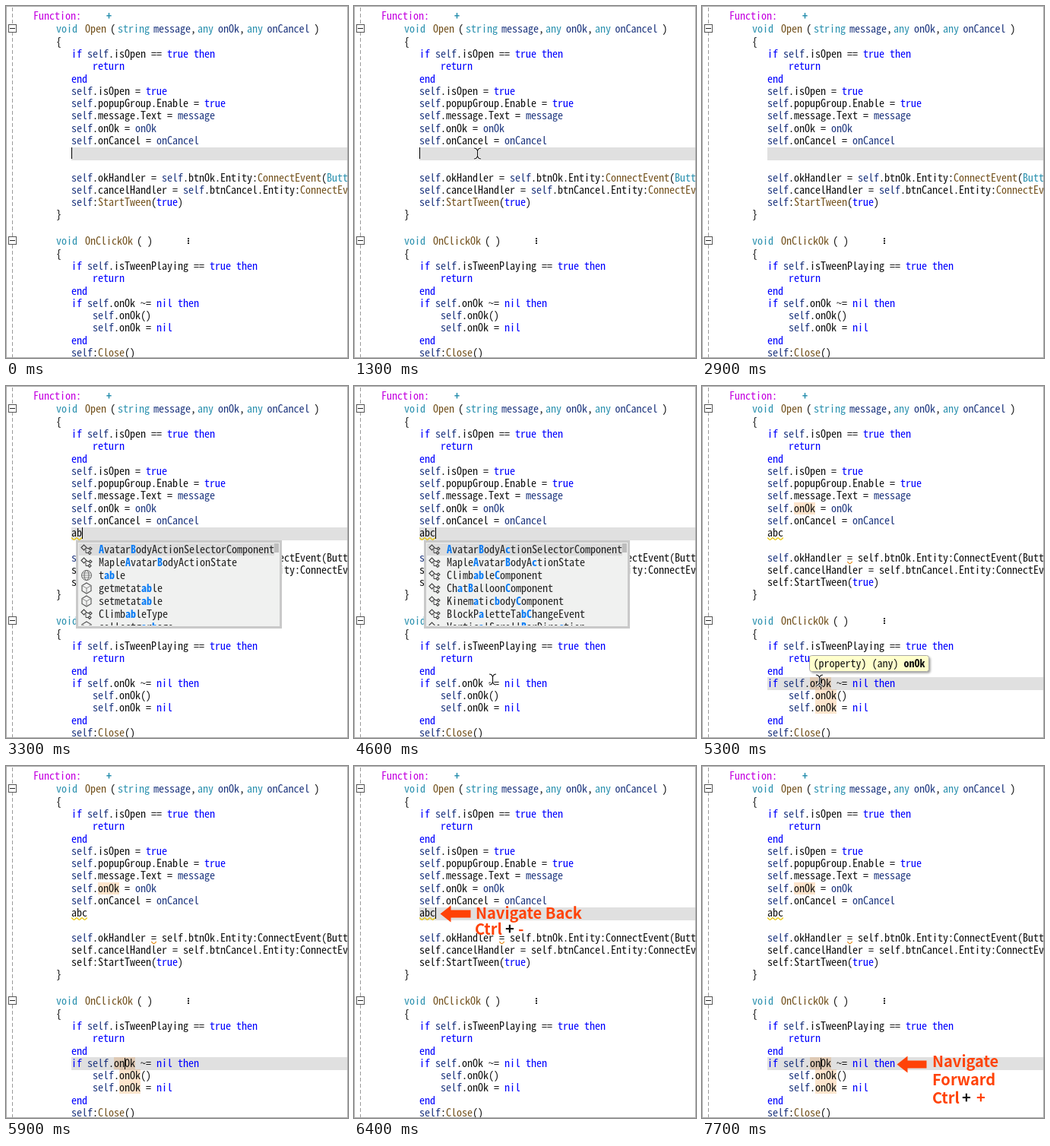
Animation, 450 px wide and 463 px high, one loop 8000 ms. Source, as an HTML page with a canvas:

```html
<!DOCTYPE html>
<html lang="en">
<head>
<meta charset="utf-8">
<title>Navigate back and forward</title>
<style>
  html, body { margin: 0; width: 450px; height: 463px; overflow: hidden; background: #fff; }
  canvas { display: block; width: 450px; height: 463px; }
</style>
</head>
<body>
<canvas id="stage"></canvas>
<script>
const W = 450, H = 463, LOOP = 8000, CHAR = 7;
const MONO = '"Noto Sans Mono CJK KR", "Noto Sans Mono CJK JP", "Noto Sans Mono", monospace';
const SANS = '"Noto Sans CJK KR", "Noto Sans CJK JP", "Open Sans", sans-serif';
const INK = '#111', NAVY = '#1f377f', BLUE = '#0000ff', TEAL = '#2b91af',
      BROWN = '#74531f', ORANGE = '#ff4207', GRAY = '#e0e0e0';

const canvas = document.getElementById('stage');
const ctx = canvas.getContext('2d');
const ratio = window.devicePixelRatio || 1;
canvas.width = W * ratio;
canvas.height = H * ratio;
ctx.scale(ratio, ratio);

function sizeFor(family, text, width, weight = 400) {
  ctx.font = `${weight} 100px ${family}`;
  return 100 * width / ctx.measureText(text).width;
}
const codeSize = sizeFor(MONO, 'mmmmmmmmmm', 10 * CHAR);
const noteSize = sizeFor(SANS, 'Navigate Back', 140, 700);
const codeFont = `${codeSize}px ${MONO}`;
const boldFont = `700 ${codeSize}px ${MONO}`;
const noteFont = `700 ${noteSize}px ${SANS}`;

// Code: baselines of the two bodies and their lines
const openY = i => 68 + 16.25 * i;
const clickY = i => 347 + 16.27 * i;
const openBody = [
  'if self.isOpen == true then',
  '    return',
  'end',
  'self.isOpen = true',
  'self.popupGroup.Enable = true',
  'self.message.Text = message',
  'self.onOk = onOk',
  'self.onCancel = onCancel',
  '', '',
  'self.okHandler = self.btnOk.Entity:ConnectEvent(ButtonClickEvent',
  'self.cancelHandler = self.btnCancel.Entity:ConnectEvent',
  'self:StartTween(true)'
];
const clickBody = [
  'if self.isTweenPlaying == true then',
  '    return',
  'end',
  'if self.onOk ~= nil then',
  '    self.onOk()',
  '    self.onOk = nil',
  'end',
  'self:Close()'
];
const headings = [
  [36, 18, 'Function:', '#c400e0'], [132, 18, '+', TEAL, boldFont],
  [66, 34.5, 'void', TEAL], [104, 34.5, 'Open', BROWN], [137, 34.5, '('],
  [147, 34.5, 'string', TEAL], [194, 34.5, 'message', NAVY], [243, 34.5, ','],
  [252, 34.5, 'any', TEAL], [279, 34.5, 'onOk', NAVY], [307, 34.5, ','],
  [317, 34.5, 'any', TEAL], [343.5, 34.5, 'onCancel', NAVY], [405.5, 34.5, ')'],
  [66, 51.5, '{'], [66, 279, '}'],
  [66, 314, 'void', TEAL], [104, 314, 'OnClickOk', BROWN], [172, 314, '( )'],
  [66, 331, '{']
];

// Completion lists: an icon letter, then a label with _ before each matched letter
const listAb = [
  'c:_Avatar_BodyActionSelectorComponent', 'c:Maple_Avatar_BodyActionState',
  'g:t_a_ble', 'f:getmetat_a_ble', 'f:setmetat_a_ble',
  'c:Climb_a_bleType', 'f:collectg_ar_bage'
];
const listAbc = [
  'c:_Avatar_BodyA_ctionSelectorComponent', 'c:Maple_Avatar_BodyA_ctionState',
  'c:Climb_a_ble_Component', 'c:Ch_at_Balloon_Component',
  'c:Kinem_atic_body_Component', 'c:BlockP_aletteTa_b_ChangeEvent',
  'c:Vertic_alScroll_BarDire_ction'
];

// Steps, each held until the next
const typing = [[0, ''], [3000, 'a'], [3200, 'ab'], [3500, 'abc']];
const blink = [[0, 1], [300, 0], [800, 1], [1800, 0], [2400, 1], [2900, 0], [3000, 1],
  [4000, 0], [4500, 1], [5400, 0], [5900, 1]];
const mouse = [[0], [200, 408, 71], [300, 366, 98], [400, 308, 134], [500, 246, 170],
  [600, 196, 194], [700, 170, 205], [800, 162, 204], [1300, 162, 194],
  [1800, 268, 215], [1900], [4400, 262, 402], [4500, 214, 390], [4600, 182, 386],
  [4700, 168, 386], [4800, 159, 386], [4900, 154, 387], [5400, 164, 399],
  [5500, 212, 425], [5600, 278, 449], [5700]];
const at = (steps, t) => steps.filter(s => s[0] <= t).pop();

function box(x, y, w, h, fill) {
  ctx.fillStyle = fill;
  ctx.fillRect(x, y, w, h);
}

function path(points, color, width = 1, close = false) {
  ctx.beginPath();
  points.forEach(([x, y]) => ctx.lineTo(x, y));
  if (close) ctx.closePath();
  ctx.strokeStyle = color;
  ctx.lineWidth = width;
  ctx.stroke();
}

function write(x, y, text, color = INK, font = codeFont) {
  ctx.font = font;
  ctx.fillStyle = color;
  ctx.fillText(text, x, y);
  return x + ctx.measureText(text).width;
}

function tokenColor(word, before, after) {
  if (/^(if|then|return|end|true|nil)$/.test(word)) return BLUE;
  if (word === 'self') return NAVY;
  if (/^Button/.test(word)) return TEAL;
  if (/^(ConnectEvent|StartTween|Close)$/.test(word)) return BROWN;
  if (/= $/.test(before) && !after) return NAVY;
  return INK;
}

// From column plainFrom on, only keywords keep their colour
function codeLine(line, y, plainFrom = Infinity) {
  for (const m of line.matchAll(/\w+|[^\w\s]+/g)) {
    const end = m.index + m[0].length;
    const color = tokenColor(m[0], line.slice(0, m.index), line.slice(end));
    const plain = m.index >= plainFrom && color !== BLUE;
    write(86 + m.index * CHAR, y, m[0], plain ? INK : color);
  }
}

function squiggle(x, y, w, color) {
  const points = [];
  for (let i = 0; i <= w; i += 0.5)
    points.push([x + i, y - 1.2 * Math.cos(i * 2 * Math.PI / CHAR)]);
  path(points, color, 1.2);
}

function margin() {
  ctx.setLineDash([5, 3]);
  path([[8.5, 2], [8.5, H]], '#999');
  ctx.setLineDash([]);
  for (const y of [30, 309]) {
    box(3, y - 6, 11, 11, '#fff');
    ctx.strokeStyle = '#555';
    ctx.lineWidth = 1;
    ctx.strokeRect(3.5, y - 5.5, 10, 10);
    path([[5, y - 0.5], [12, y - 0.5]], '#222');
  }
}

function icon(kind, x, y) {
  const ink = '#444';
  if (kind === 'c') {
    const diamond = (dx, dy, r) => path([[x + dx - r, y + dy], [x + dx, y + dy - r],
      [x + dx + r, y + dy], [x + dx, y + dy + r]], ink, 1.1, true);
    diamond(-3.5, -2.5, 3.5);
    diamond(5, -1, 2);
    diamond(4, 4.5, 2);
    path([[x, y - 1.5], [x + 3, y - 1.5]], ink);
    path([[x - 1, y], [x - 1, y + 4.5], [x + 2, y + 4.5]], ink);
  } else if (kind === 'g') {
    ctx.strokeStyle = '#666';
    ctx.lineWidth = 1;
    for (const r of [6.5, 3]) {
      ctx.beginPath();
      ctx.ellipse(x, y, r, 6.5, 0, 0, 7);
      ctx.stroke();
    }
    for (const d of [-3, 0, 3]) path([[x - 6, y + d], [x + 6, y + d]], '#777', 0.8);
  } else {
    const corners = [[0, -7], [6, -3.5], [6, 3.5], [0, 7], [-6, 3.5], [-6, -3.5]]
      .map(([a, b]) => [x + a, y + b]);
    path(corners, '#555', 1.1, true);
    path([corners[5], [x, y], corners[1]], '#888');
    path([[x, y], corners[3]], '#888');
  }
}

function popup(items) {
  box(92, 203, 271, 116, '#c9c9c9');
  box(95, 206, 265, 110, '#f0f1f0');
  box(96, 207, 257, 16, '#dcdcdc');
  box(353, 207, 6, 12, '#bdbdbd');
  ctx.save();
  ctx.beginPath();
  ctx.rect(95, 206, 265, 109);
  ctx.clip();
  items.forEach((item, i) => {
    const y = 215 + 17 * i;
    icon(item[0], 106, y);
    let x = 122;
    for (const [part] of item.slice(2).matchAll(/_.|[^_]+?(?=_|$)/g)) {
      const hit = part[0] === '_';
      x = write(x, y + 5, hit ? part[1] : part, hit ? '#0a7cf5' : '#222',
        hit ? boldFont : codeFont);
    }
  });
  ctx.restore();
}

function tooltip() {
  ctx.save();
  ctx.shadowColor = 'rgba(0,0,0,.4)';
  ctx.shadowBlur = 3;
  ctx.shadowOffsetX = ctx.shadowOffsetY = 2;
  ctx.beginPath();
  ctx.roundRect(141.5, 354.5, 157, 21, 3);
  ctx.fillStyle = '#ffffcc';
  ctx.fill();
  ctx.restore();
  ctx.strokeStyle = '#aaa';
  ctx.lineWidth = 1;
  ctx.stroke();
  write(write(146.5, 370, '(property) (any) '), 370, 'onOk', INK, boldFont);
}

function pointer(x, y) {
  const shape = [[[-4.5, -7], [-2, -6.5], [0, -4], [2, -6.5], [4.5, -7]],
    [[0, -4], [0, 4]], [[-4.5, 7], [-2, 6.5], [0, 4], [2, 6.5], [4.5, 7]]];
  for (const [color, width] of [['#fff', 3], ['#111', 1.2]])
    shape.forEach(s => path(s.map(([a, b]) => [x + 0.5 + a, y + b]), color, width));
}

function arrow(x, y, length) {
  ctx.beginPath();
  [[0, 0], [14, -11], [14, -5], [length, -5], [length, 5], [14, 5], [14, 11]]
    .forEach(([a, b]) => ctx.lineTo(x + a, y + b));
  ctx.fillStyle = ORANGE;
  ctx.fill();
}

const note = (x, y, text, color = ORANGE) => write(x, y, text, color, noteFont);

function draw(t) {
  const back = t >= 6400 && t < 7700;
  const upper = t < 5000 || back;
  const broken = t >= 3200;
  const typed = at(typing, t)[1];
  box(0, 0, W, H, '#fff');
  margin();
  box(86, upper ? 186 : 383, 363, 17, GRAY);

  if (!upper && t >= 5100) {
    ctx.globalCompositeOperation = 'multiply';
    for (const [x, y] of [[121, openY(6)], [142, clickY(3)], [149, clickY(4)], [149, clickY(5)]])
      box(x, Math.round(y) - 13, 28, 16, '#fde5cd');
    ctx.globalCompositeOperation = 'source-over';
  }

  headings.forEach(h => write(...h));
  // The half-typed word breaks parsing from the next "=" to the end of the body
  openBody.forEach((line, i) => {
    const plainFrom = i > 10 ? 0 : line.indexOf('=');
    codeLine(line, openY(i), broken && i >= 10 ? plainFrom : Infinity);
  });
  clickBody.forEach((line, i) => codeLine(line, clickY(i)));
  for (const y of [305, 308, 311]) box(239, y, 2, 2, '#111');

  write(86, openY(8), typed);
  if (broken) {
    squiggle(86, 201, typed.length * CHAR, '#e8c400');
    squiggle(191, 232.5, CHAR, '#e8952a');
  }
  if (at(blink, t)[1]) {
    if (upper) box(86 + typed.length * CHAR, 186, 1, 15, '#000');
    else box(156, 384, 1, 15, '#000');
  }

  if (t >= 3300 && t < 5000) popup(t < 3500 ? listAb : listAbc);
  if (t >= 5300 && t < 5500) tooltip();
  const [, x, y] = at(mouse, t);
  if (x) pointer(x, y);

  if (back) {
    arrow(113.5, 194.5, 40);
    note(160, 201, 'Navigate Back');
    note(159, 222, 'Ctrl');
    note(199, 222, '+', '#111');
    note(216, 222, '-');
  } else if (t >= 7700) {
    arrow(256.5, 392.5, 39);
    note(303, 396, 'Navigate');
    note(303, 420, 'Forward');
    note(303, 444, 'Ctrl');
    note(342, 444, '+', '#111');
    note(361, 444, '+');
  }

  ctx.strokeStyle = '#ababab';
  ctx.lineWidth = 1;
  ctx.strokeRect(0.5, 0.5, W - 1, H - 1);
}

const start = performance.now();
function tick() {
  draw((performance.now() - start) % LOOP);
  requestAnimationFrame(tick);
}
tick();
</script>
</body>
</html>
```
